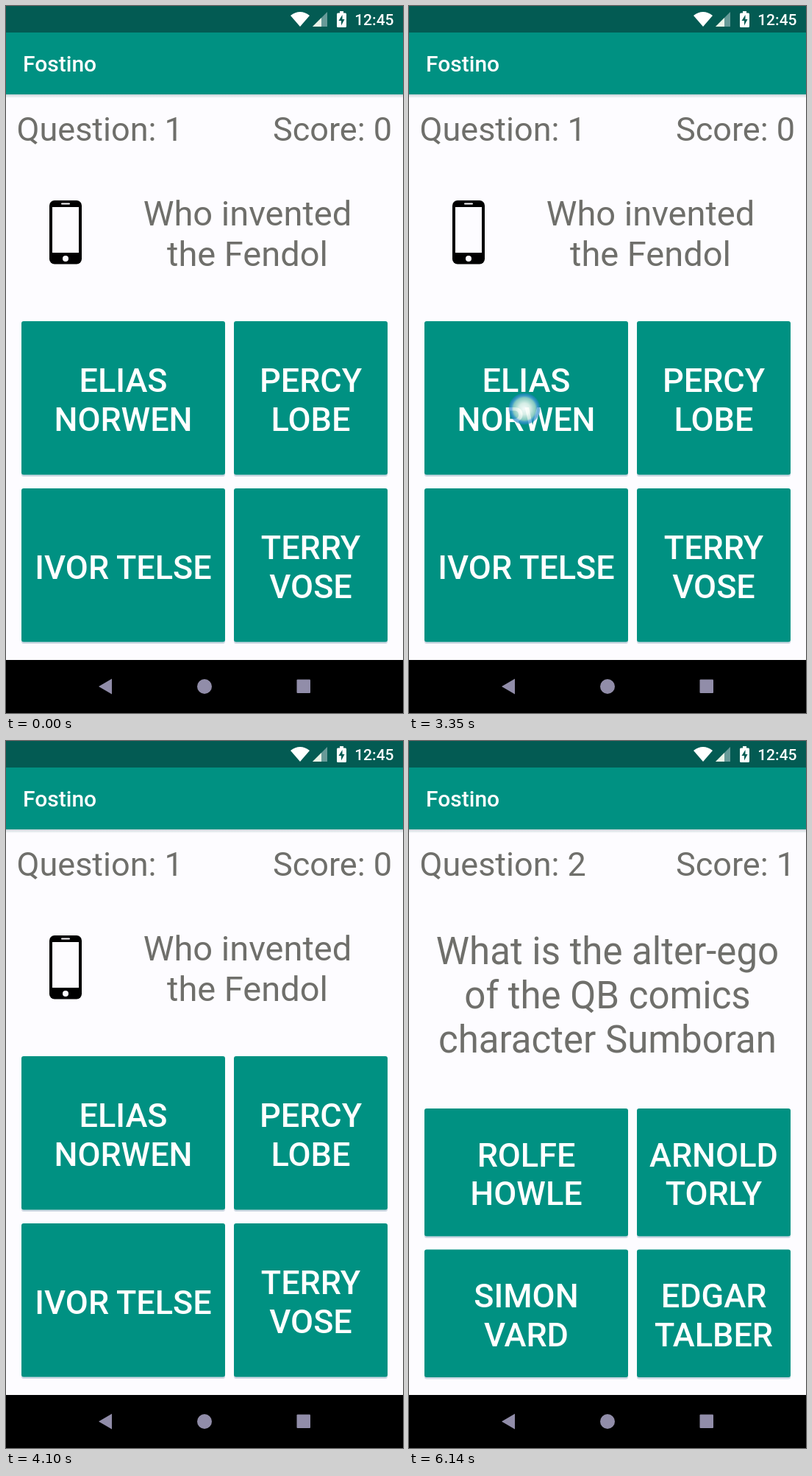
An HTML page for the animation above (8000 ms loop, 540 by 960 pixels).

```html
<!DOCTYPE html>
<html lang="en">
<head>
<meta charset="utf-8">
<title>Quiz</title>
<style>
html, body { margin: 0; width: 100%; height: 100%; overflow: hidden; background: #fdfcff; }
svg { display: block; width: 100vw; height: 100vh; font-family: Roboto, sans-serif; }
.mid { text-anchor: middle; }
.end { text-anchor: end; }
.label { font-size: 45px; font-weight: 500; fill: #fff; text-anchor: middle; }
.info { fill: #6f6f6b; }
</style>
</head>
<body>
<svg viewBox="0 0 540 960">
  <defs>
    <radialGradient id="glow">
      <stop offset="0" stop-color="#fff" stop-opacity=".95"/>
      <stop offset=".35" stop-color="#f2faf4" stop-opacity=".88"/>
      <stop offset=".68" stop-color="#b5ddd5" stop-opacity=".75"/>
      <stop offset=".8" stop-color="#4d9fd8" stop-opacity=".8"/>
      <stop offset=".93" stop-color="#2585c4" stop-opacity=".65"/>
      <stop offset="1" stop-color="#2585c4" stop-opacity="0"/>
    </radialGradient>
    <linearGradient id="drop" x2="0" y2="1">
      <stop offset="0" stop-color="#c8d3d8"/>
      <stop offset="1" stop-color="#fdfcff"/>
    </linearGradient>
  </defs>
  <rect width="540" height="960" fill="#fdfcff"/>

  <rect width="540" height="36" fill="#035b53"/>
  <path d="M387 13Q400 3 413 13L400 28Z" fill="#fff"/>
  <path d="M437 8V28H417Z" fill="#679a98"/>
  <path d="M429 16V28H417Z" fill="#e9f3e8"/>
  <path d="M454 7H459V9.500H461.500Q463 9.500 463 11V27.500Q463 29 461.500 29H451.500Q450 29 450 27.500V11Q450 9.500 451.500 9.500H454Z" fill="#fff"/>
  <path d="M457.500 12L452.500 20H456V26.500L460.500 18H457.500Z" fill="#035b53"/>
  <text x="527.500" y="26" class="end" font-size="21" font-weight="500" fill="#fff">12:45</text>

  <rect y="36" width="540" height="84" fill="#009182"/>
  <rect y="120" width="540" height="5" fill="url(#drop)"/>
  <text x="23" y="89" font-size="30" font-weight="500" fill="#fff">Fostino</text>

  <g class="info" font-size="45">
    <text id="count" x="14.500" y="183"></text>
    <text id="score" x="525" y="183" class="end"></text>
  </g>

  <g id="first">
    <rect x="59" y="264" width="44" height="86.500" rx="7"/>
    <rect x="63" y="273" width="36" height="62" fill="#fdfcff"/>
    <rect x="75" y="267.500" width="12" height="2" rx="1" fill="#fdfcff"/>
    <circle cx="81" cy="343" r="4" fill="#fdfcff"/>
  </g>
  <g id="second"></g>
  <circle id="touch" r="22" fill="url(#glow)"/>

  <rect y="888" width="540" height="72"/>
  <g fill="#918da9">
    <path d="M126 924L144 913.500V934.500Z"/>
    <circle cx="270" cy="924" r="10"/>
    <rect x="395.500" y="914.500" width="18.500" height="18.500" rx="1"/>
  </g>
</svg>
<script>
const LOOP = 8000, TEAL = '#009182', RED = '#d94a55', OLIVE = '#8fb457';
const columns = [[21, 277], [310, 209]];
const el = id => document.getElementById(id);

// A tap shows the finger, then the answer's colour, then resets.
const tapAt = (down, x, y) => ({ down, up: down + 140, done: down + 700, x, y });
const wrong = tapAt(3350, 157, 547), right = tapAt(5390, 414, 547);

function add(parent, tag, attrs, text) {
  const node = document.createElementNS('http://www.w3.org/2000/svg', tag);
  for (const key in attrs) node.setAttribute(key, attrs[key]);
  if (text) node.textContent = text;
  parent.appendChild(node);
  return node;
}

function addQuestion(parent, lines, x, y, size, step) {
  lines.forEach((line, i) =>
    add(parent, 'text', { x, y: y + i * step, class: 'info mid', 'font-size': size }, line));
}

function addButtons(parent, labels, tops, height) {
  return labels.map((lines, i) => {
    const [x, width] = columns[i % 2], y = tops[i >> 1];
    const box = { x, y, width, height, rx: 3 };
    const shadow = add(parent, 'rect', { ...box, y: y + 2.5, fill: '#d0d9e4' });
    const face = add(parent, 'rect', { ...box, fill: TEAL });
    const base = y + height / 2 + (lines.length > 1 ? -8 : 18.5);
    lines.forEach((line, k) =>
      add(parent, 'text', { x: x + width / 2, y: base + k * 52.7, class: 'label' }, line));
    return { face, shadow, y };
  });
}

addQuestion(el('first'), ['Who invented', 'the Fendol'], 328.5, 298, 47, 55);
const buttons = addButtons(el('first'),
  [['ELIAS', 'NORWEN'], ['PERCY', 'LOBE'], ['IVOR TELSE'], ['TERRY', 'VOSE']], [428, 655], 208.5);

addQuestion(el('second'), ['What is the alter-ego', 'of the QB comics', 'character Sumboran'], 270, 303, 51, 60);
addButtons(el('second'),
  [['ROLFE', 'HOWLE'], ['ARNOLD', 'TORLY'], ['SIMON', 'VARD'], ['EDGAR', 'TALBER']], [499, 690.5], 173.5);

const within = (t, a, b) => t >= a && t < b;

function paintButton(button, tap, color, t) {
  button.face.setAttribute('fill', within(t, tap.up, tap.done) ? color : TEAL);
  const lift = t < tap.up ? (t - tap.down) / 100 : 1 - (t - tap.up) / 100;
  button.shadow.setAttribute('y', button.y + 2.5 + 2 * Math.max(0, Math.min(1, lift)));
}

function draw(t) {
  const next = t >= right.done;
  el('first').style.display = next ? 'none' : '';
  el('second').style.display = next ? '' : 'none';
  el('count').textContent = 'Question: ' + (next ? 2 : 1);
  el('score').textContent = 'Score: ' + (next ? 1 : 0);
  paintButton(buttons[0], wrong, RED, t);
  paintButton(buttons[1], right, OLIVE, t);

  const tap = [wrong, right].find(p => within(t, p.down, p.up));
  el('touch').style.display = tap ? '' : 'none';
  if (tap) {
    el('touch').setAttribute('cx', tap.x);
    el('touch').setAttribute('cy', tap.y);
  }
}

const start = performance.now();
function tick() {
  draw((performance.now() - start) % LOOP);
  requestAnimationFrame(tick);
}
tick();
</script>
</body>
</html>
```
